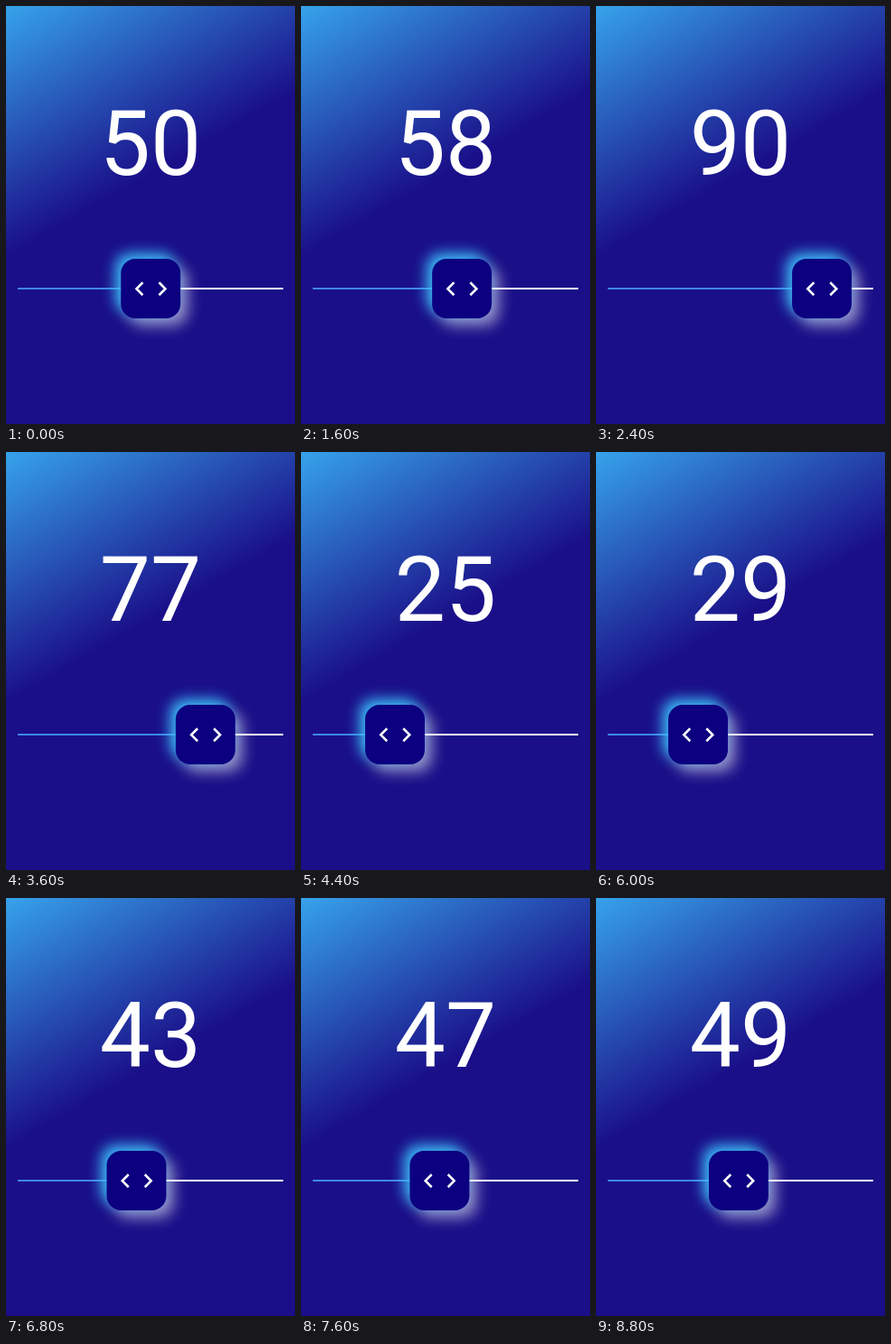
Write an HTML page that moves like this. It is 320 px wide and 463 px high and loops after 9000 ms.

```html
<!DOCTYPE html>
<html lang="en">
<head>
<meta charset="utf-8">
<title>Range slider</title>
<style>
  html, body { margin: 0; width: 100%; height: 100%; overflow: hidden; }
  .stage {
    position: relative; width: 320px; height: 463px; overflow: hidden;
    background: linear-gradient(150deg, #36a3eb 0%, #1a0f88 43%);
  }
  .value {
    position: absolute; left: 0; top: 94px; width: 320px;
    font: 400 100px/117px Roboto, sans-serif;
    text-align: center; color: #fff;
  }
  .track, .fill { position: absolute; left: 13px; top: 312.2px; height: 1.6px; }
  .track { width: 294px; background: #fff; }
  .fill { background: #3f86e8; }
  .thumb {
    position: absolute; left: -33.25px; top: 279.75px; width: 66.5px; height: 66.5px;
    border-radius: 16px; background: #0c0080;
    box-shadow: -6px -6px 15px #3cc0fb, 8px 8px 16px rgba(255, 255, 255, .55);
  }
  .thumb svg { display: block; width: 100%; height: 100%; }
  .thumb path { fill: none; stroke: #fff; stroke-width: 2.5; }
</style>
</head>
<body>
<div class="stage">
  <div class="value">50</div>
  <div class="track"></div>
  <div class="fill"></div>
  <div class="thumb">
    <svg viewBox="-33.25 -33.25 66.5 66.5">
      <path d="M-9 -7L-16 0L-9 7M9 -7L16 0L9 7"/>
    </svg>
  </div>
</div>
<script>
  const LOOP = 9000, TICK = 200, CENTER = 160.2, STEP = 2.247;

  // [time in ms, slider value]
  const keys = [
    [0, 50], [1150, 50], [1600, 58], [2400, 90], [2880, 100], [3600, 77.2],
    [4400, 25], [4800, 7], [5000, 1.4], [5200, 0], [6000, 29], [6800, 43],
    [7200, 45.5], [8400, 48], [8800, 49], [9000, 50]
  ];

  const slope = i => (keys[i + 1][1] - keys[i][1]) / (keys[i + 1][0] - keys[i][0]);

  // Flat at turning points, harmonic mean elsewhere, so it never overshoots.
  function tangent(i) {
    if (i === 0 || i === keys.length - 1) return 0;
    const a = slope(i - 1), b = slope(i);
    return a * b <= 0 ? 0 : 2 * a * b / (a + b);
  }

  function valueAt(t) {
    let i = 0;
    while (i < keys.length - 2 && t >= keys[i + 1][0]) i++;
    const [t0, v0] = keys[i], [t1, v1] = keys[i + 1];
    const d = t1 - t0, u = (t - t0) / d, w = 1 - u;
    return v0 * (1 + 2 * u) * w * w + v1 * u * u * (3 - 2 * u)
      + d * u * w * (w * tangent(i) - u * tangent(i + 1));
  }

  const [label, fill, thumb] = ['.value', '.fill', '.thumb'].map(s => document.querySelector(s));

  function draw(ms) {
    const t = Math.floor((ms % LOOP) / TICK) * TICK;
    const value = Math.round(valueAt(t));
    const x = CENTER + (value - 50) * STEP;
    label.textContent = value;
    fill.style.width = x - 13 + 'px';
    thumb.style.transform = `translateX(${x}px)`;
  }

  const start = performance.now();
  function loop() {
    draw(performance.now() - start);
    requestAnimationFrame(loop);
  }
  loop();
</script>
</body>
</html>
```
